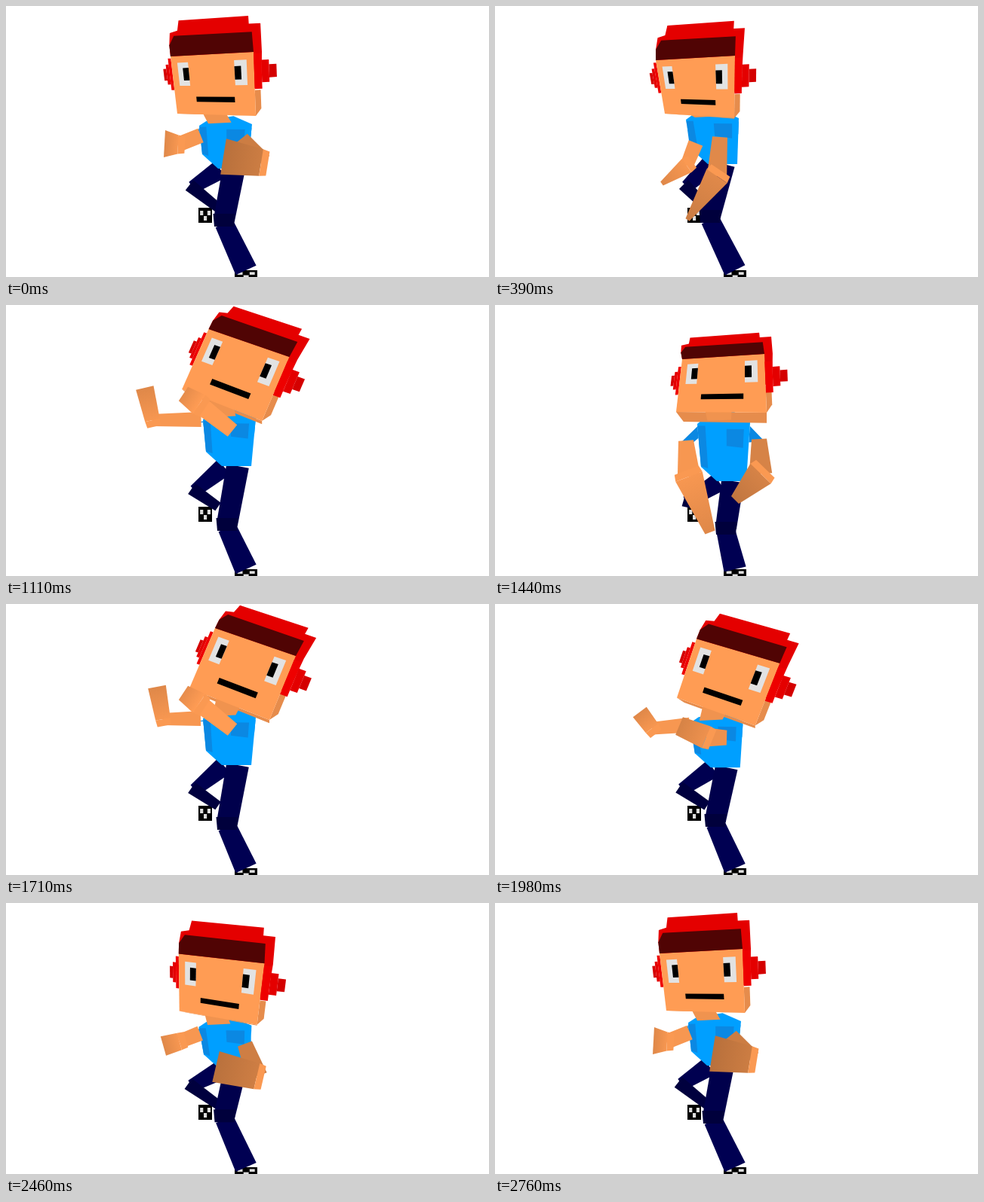
An HTML page with a canvas that plays this animation: 640 by 360 pixels, repeating every 2.79 s.

```html
<!DOCTYPE html>
<html lang="en">
<head>
<meta charset="utf-8">
<title>Dancing block figure</title>
<style>
html, body { margin: 0; width: 100%; height: 100%; overflow: hidden; background: #fff; }
canvas { display: block; width: 640px; height: 360px; }
</style>
</head>
<body>
<canvas id="stage" width="640" height="360"></canvas>
<script>
const ctx = document.getElementById('stage').getContext('2d');
const LOOP = 2790, STEP = 30;

// Time, pose, head shift, left arm stretch
const keys = [
  [0, 0, 0, 1], [390, 1, 0, 1], [810, 2, 0, 1], [1010, 4, 4, 1.1], [1140, 4, -12, 1.31],
  [1440, 3, 0, 1], [1710, 4, 0, 1], [1800, 4, 2, 1.31], [2220, 5, 0, 1], [2760, 0, 0, 1]
];

// Joints of the six poses
const rig = {
  // face corners clockwise from top left
  face: [
    [218,67, 328,61, 331,146, 227,143], [213,72, 318,66, 317,149, 225,143],
    [250,41, 364,67, 331,157, 240,114], [248,72, 357,65, 360,143, 240,142],
    [277,32, 384,69, 349,154, 243,112], [242,68, 357,94, 334,173, 233,144]
  ],
  // from the forehead to the brim
  up: [[1,-27], [4,-26], [7,-23], [1,-16], [14,-19], [9,-24]],
  // chest, hip, front knee, back knee
  body: [
    [291,158, 302,216, 289,284, 247,241], [288,150, 303,210, 285,279, 254,240],
    [291,156, 299,214, 285,290, 250,241], [303,157, 315,234, 306,296, 254,262],
    [296,151, 307,214, 293,291, 250,247], [290,166, 306,222, 290,281, 245,245]
  ],
  // shoulder, elbow, fingertips, width at elbow and fingertips
  armL: [
    [258,172, 228,184, 210,183, 25,36], [266,182, 254,212, 221,236, 22,6],
    [257,164, 226,130, 208,136, 38,30], [253,180, 257,228, 285,302, 38,14],
    [258,152, 208,153, 200,110, 20,24], [257,174, 231,184, 207,195, 22,20]
  ],
  armR: [
    [312,176, 338,208, 288,200, 36,48], [298,174, 294,226, 255,284, 33,6],
    [290,146, 240,117, 222,113, 14,22], [350,178, 352,224, 318,259, 38,14],
    [300,167, 256,132, 235,118, 30,22], [318,194, 322,246, 264,230, 34,34]
  ],
  lit: [[.8], [.88], [.98], [.84], [1], [.82]]
};

const tweak = {
  face: (v, i, k) => i % 2 ? v : v + k[2],
  armL: (v, i, k) => i % 2 || i > 5 ? v : 256 + (v - 256) * k[3]
};
const tracks = {};
for (const name in rig) {
  const change = tweak[name] || (v => v);
  tracks[name] = keys.map(k => rig[name][k[1]].map((v, i) => change(v, i, k)));
}

const last = keys.length - 1;
const span = i => keys[i + 1][0] - keys[i][0];

// Smooth curve through the keys, without overshoot
function tangent(rows, k, c) {
  const a = (k + last - 1) % last, b = k % last;
  const s = (rows[a + 1][c] - rows[a][c]) / span(a);
  const r = (rows[b + 1][c] - rows[b][c]) / span(b);
  return s * r <= 0 ? 0 : 2 * s * r / (s + r);
}

function poseAt(t) {
  let k = 0;
  while (k < last - 1 && t >= keys[k + 1][0]) k++;
  const h = span(k), x = Math.min(1, (t - keys[k][0]) / h), y = 1 - x;
  const pose = {};
  for (const name in tracks) {
    const rows = tracks[name];
    pose[name] = rows[k].map((v, c) =>
      y * y * (1 + 2 * x) * v + x * x * (3 - 2 * x) * rows[k + 1][c] +
      h * x * y * (y * tangent(rows, k, c) - x * tangent(rows, k + 1, c)));
  }
  return pose;
}

const points = list => list.flatMap((v, i) => i % 2 ? [] : [[v, list[i + 1]]]);
const sub = (a, b) => [a[0] - b[0], a[1] - b[1]];
const add = (p, v, k = 1) => [p[0] + v[0] * k, p[1] + v[1] * k];
const unit = v => add([0, 0], v, 1 / (Math.hypot(...v) || 1));
const skin = k => `rgb(${255 * k}, ${156 * k}, ${84 * k})`;

function poly(pts, fill) {
  ctx.fillStyle = fill;
  ctx.beginPath();
  pts.forEach(p => ctx.lineTo(...p));
  ctx.closePath();
  ctx.fill();
}

// Tapered bar from a to b
function limb(a, b, wa, wb, fill) {
  const [x, y] = unit(sub(b, a)), n = [-y, x];
  poly([add(a, n, wa / 2), add(b, n, wb / 2), add(b, n, -wb / 2), add(a, n, -wa / 2)], fill);
}

// Perspective map from the unit square to a quad
function project([a, b, c, d]) {
  const e = sub(b, c), f = sub(d, c), s = add(sub(a, b), sub(c, d));
  const cross = (p, q) => p[0] * q[1] - p[1] * q[0];
  const g = cross(s, f) / cross(e, f), h = cross(e, s) / cross(e, f);
  return (u, v) => [0, 1].map(i =>
    ((b[i] - a[i] + g * b[i]) * u + (d[i] - a[i] + h * d[i]) * v + a[i]) / (g * u + h * v + 1));
}

function patch(at, u0, v0, u1, v1, fill) {
  poly([at(u0, v0), at(u1, v0), at(u1, v1), at(u0, v1)], fill);
}

function shoe(x, y, w, h) {
  ctx.fillStyle = '#000';
  ctx.fillRect(x, y, w, h);
  ctx.fillStyle = '#ddd';
  for (let i = 0; i < 3; i++) ctx.fillRect(x + w * (.12 + .27 * i), y + h * (i % 2 ? .55 : .2), w * .23, h * .3);
}

function drawLegs([, hip, kneeF, kneeB]) {
  shoe(255, 268, 18, 20);
  limb(add(hip, [-18, 1]), kneeB, 26, 17, '#000050');
  limb(add(kneeB, [-4, -3]), [281, 268], 17, 13, '#00003e');
  shoe(303, 351, 30, 12);
  limb(add(kneeF, [0, 5]), [318, 351], 25, 30, '#000052');
  limb(hip, kneeF, 30, 28, '#00004c');
  limb(add(kneeF, [0, -8]), add(kneeF, [0, 9]), 29, 26, '#00003c');
}

function drawShirt([chest, hip], shoulderL, shoulderR) {
  const at = project([add(chest, [-35, 1]), add(chest, [35, -1]), add(hip, [18, 0]), add(hip, [-42, -19])]);
  const blue = '#009fff', dark = '#0b88e2';
  poly([at(0, .05), at(0, .3), add(shoulderL, [8, 4]), add(shoulderL, [-8, 4])], dark);
  poly([at(1, .05), at(1, .3), add(shoulderR, [-8, 4]), add(shoulderR, [8, 4])], dark);
  poly([at(0, 0), at(.25, -.14), at(.75, -.18), at(1, 0), at(1, 1), add(hip, [-21, 0]), at(0, 1)], blue);
  patch(at, 0, .04, .2, .98, dark);
  patch(at, .64, .1, .92, .4, dark);
  return at;
}

function drawHead(corners, up, torso) {
  const [tl, tr, br, bl] = corners;
  const at = project(corners), across = sub(tr, tl), lift = Math.hypot(...up);
  const out = (p, side, height = 0) => add(add(p, across, side), up, height);

  // Stepped ear cups
  const cup = (edge, sign, mid, steps, depth) => {
    for (let i = 0; i < steps; i++) {
      const h = [.27, .17, .1][i], a = sign * depth * i, b = sign * depth * (i + 1);
      const top = at(edge, mid - h), low = at(edge, mid + h);
      poly([out(top, a), out(top, b), out(low, b), out(low, a)], ['#ee0000', '#e40000', '#d40000'][i]);
    }
  };
  const ear = .57 - .011 * lift;
  cup(0, -1, ear + .03, 3, .035);

  // Hair: crown, brim and right side
  poly([out(tl, -.02, .55), out(tl, -.02, 1.15), out(tl, .07, 1.25), out(tl, .08, 1.75),
    out(tr, -.08, 1.8), out(tr, -.07, 1.4), out(tr, .07, 1.4), out(tr, .1),
    out(at(1, .55), .08), at(1, .55), tl], '#e40000');

  // Underside shows when the head leans back
  const chin = [0, Math.max(0, 27 - lift) * 1.25];
  poly([bl, br, add(br, chin), out(add(bl, chin), .09)], skin(.9));
  poly([br, out(at(1, .88), .07), out(at(1, .58), .07), at(1, .58)], skin(.9));
  poly([at(.34, .95), at(.64, .95), torso(.72, -.05), torso(.26, -.05)], skin(.94));
  poly(corners, skin(1));
  poly([tl, out(tl, -.02, .55), out(tl, .03, 1), out(tr, -.03, 1), tr], '#500404');
  cup(1, 1, ear + .02, 3, .09);

  patch(at, .08, .11, .22, .5, '#e2e2e2');
  patch(at, .78, .11, .92, .5, '#e2e2e2');
  patch(at, .145, .2, .22, .41, '#000');
  patch(at, .78, .2, .855, .41, '#000');
  patch(at, .285, .69, .765, .78, '#000');
}

function drawArm(list, lit) {
  const [shoulder, elbow, tip] = points(list), [, , , , , , we, wt] = list;
  const back = add(elbow, unit(sub(elbow, tip)), 9);
  const shade = ctx.createLinearGradient(...elbow, ...tip);
  shade.addColorStop(0, skin(lit));
  shade.addColorStop(1, skin(lit * .9));
  limb(shoulder, elbow, 20, we * .8, skin(lit));
  limb(elbow, tip, we, wt, shade);
  limb(back, elbow, we * .9, we, skin(.98));
}

function draw(t) {
  const p = poseAt(t), body = points(p.body);
  ctx.fillStyle = '#fff';
  ctx.fillRect(0, 0, 640, 360);
  drawLegs(body);
  const torso = drawShirt(body, points(p.armL)[0], points(p.armR)[0]);
  drawHead(points(p.face), p.up, torso);
  drawArm(p.armL, .97);
  drawArm(p.armR, p.lit[0]);
}

let start;
function tick(now) {
  if (start === undefined) start = now;
  const t = Math.max(0, now - start) % LOOP;
  draw(Math.floor(t / STEP) * STEP);
  requestAnimationFrame(tick);
}
draw(0);
requestAnimationFrame(tick);
</script>
</body>
</html>
```
